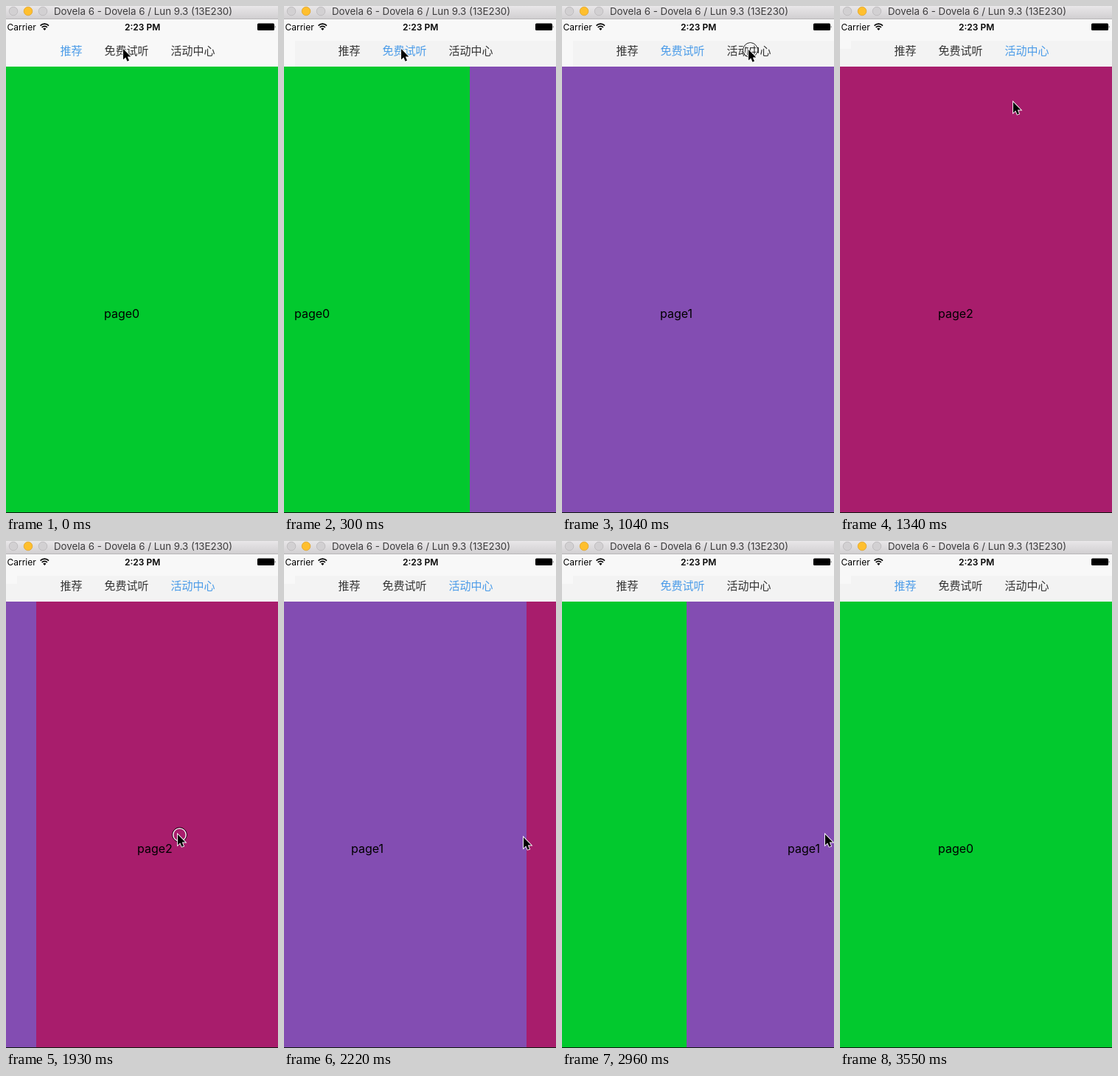
Animation, 369 px wide and 686 px high, one loop 3990 ms. Source, as an HTML page:

```html
<!DOCTYPE html>
<html lang="zh-CN">
<head>
<meta charset="utf-8">
<title>Paged tabs</title>
<style>
  html, body { margin: 0; width: 100%; height: 100%; overflow: hidden; background: #f8f8f8; }
  svg { display: block; width: 100%; height: 100%; }
  text { font-family: Inter, Roboto, sans-serif; }
  .tab { font: 15px "Noto Sans CJK SC", "Noto Sans CJK", "Noto Sans CJK JP", sans-serif; fill: #333; }
  .tab.on { fill: #4a9be8; }
  .page text { font-size: 16px; }
</style>
</head>
<body>
<svg viewBox="0 0 369 686">
  <defs>
    <linearGradient id="chrome" x2="0" y2="1">
      <stop stop-color="#e9e7e9"/><stop offset="1" stop-color="#d1cfd1"/>
    </linearGradient>
  </defs>

  <g id="pages"></g>
  <rect y="685" width="369" height="1" fill="#10180f"/>

  <rect width="369" height="82" fill="#f8f8f8"/>
  <rect id="shade" x="15" y="47" width="354" height="35" fill="#f3f3f3"/>
  <rect id="shadeLeft" y="58" width="15" height="24" fill="#f3f3f3"/>
  <g id="tabs"></g>

  <rect width="369" height="17" fill="url(#chrome)"/>
  <rect y="17" width="369" height="1" fill="#b9b7b9"/>
  <g stroke-width=".8" fill="#d2d0d2" stroke="#b9b7b9">
    <circle cx="10" cy="7" r="5.8"/>
    <circle cx="30" cy="7" r="5.8" fill="#ffbf2e" stroke="#e0a32a"/>
    <circle cx="50" cy="7" r="5.8"/>
  </g>
  <text x="65" y="12" font-size="13.3" fill="#3c3b3c">Dovela 6 - Dovela 6 / Lun 9.3 (13E230)</text>

  <text x="1.5" y="32.5" font-size="12">Carrier</text>
  <text x="161" y="32.5" font-size="12" font-weight="600">2:23 PM</text>
  <g fill="none" stroke="#000" stroke-width="1.7">
    <path d="M46.6 26.6a8 8 0 0 1 11.4 0M48.7 29a5 5 0 0 1 7.2 0"/>
    <path d="M52.3 33l-2.1-2.2a3 3 0 0 1 4.2 0z" fill="#000" stroke="none"/>
  </g>
  <rect x="341" y="23.5" width="23" height="9.5" rx="1.5"/>
  <path d="M364.8 26.3q1.5 1.9 0 3.8z"/>

  <g id="cursor">
    <g id="press" fill="none">
      <circle cx="2.5" cy=".5" r="9.8" stroke="#000"/>
      <circle cx="2.5" cy=".5" r="8.7" stroke="#fff" stroke-width="1.3"/>
    </g>
    <path d="M0 0V14.4L3.3 11.4 5.5 16.7 8 15.7 5.8 10.5H10.3Z"
      stroke="#fff" stroke-width="1.8" paint-order="stroke"/>
  </g>
</svg>
<script>
// The screen refreshes in coarse steps; all moments below are counted in them.
const LOOP = 3990, STEP = 147.8;
const PAGE_WIDTH = 375, PAGE_LEFT = -4;
const $ = id => document.getElementById(id);

// Two tab taps, then two swipes back; a swipe selects its tab after settling.
const pageTurns = [
  { start: 1.5, end: 2.83, page: 1, selectAt: 2 },
  { start: 7.2, end: 8.56, page: 2, selectAt: 8 },
  { start: 12.25, end: 15.72, page: 1, selectAt: 17 },
  { start: 18.85, end: 21.275, page: 0, selectAt: 23 }
];
const cursorMoves = [
  { start: 2.8, end: 5.8, x: 253, y: 59 },
  { start: 8.5, end: 10.2, x: 165, y: 400 },
  { start: 10.2, end: 12, x: 104, y: 392 },
  { start: 12, end: 13.8, x: 325, y: 401 },
  { start: 15.3, end: 17.7, x: 75, y: 381 },
  { start: 19, end: 20, x: 357, y: 397 },
  { start: 20.5, end: 23, x: 314, y: 606 }
];
const presses = [[1, 1], [7, 7], [12, 14], [19, 19]];
const cursorGone = 24;

function ease(u) {
  u = Math.min(1, Math.max(0, u));
  return u * u * (3 - 2 * u);
}
const follow = (moves, key, from, step) => moves.reduce(
  (value, move) => value + (move[key] - value) * ease((step - move.start) / (move.end - move.start)), from);
const show = (node, visible) => node.setAttribute("visibility", visible ? "inherit" : "hidden");
const place = (node, x, y) => node.setAttribute("transform", `translate(${Math.round(x)} ${Math.round(y)})`);

$("pages").innerHTML = ["#02c92e", "#834db2", "#a81d6c"].map((color, i) =>
  `<g class="page"><rect y="82" width="${PAGE_WIDTH}" height="604" fill="${color}"/>
   <text x="137" y="421.5">page${i}</text></g>`).join("");
$("tabs").innerHTML = [["推荐", 73.5], ["免费试听", 133.5], ["活动中心", 223.5]].map(([label, x]) =>
  `<text class="tab" x="${x}" y="65.8">${label}</text>`).join("");
const pages = [...$("pages").children], tabs = [...$("tabs").children];

function render(time) {
  const step = Math.floor(time / STEP);

  const scroll = PAGE_WIDTH * follow(pageTurns, "page", 0, step);
  pages.forEach((page, i) => place(page, PAGE_LEFT + i * PAGE_WIDTH - scroll, 0));

  const selected = pageTurns.findLast(turn => turn.selectAt <= step)?.page ?? 0;
  tabs.forEach((tab, i) => tab.classList.toggle("on", i === selected));
  show($("shade"), step >= 2);
  show($("shadeLeft"), step >= 9);

  place($("cursor"), follow(cursorMoves, "x", 159, step), follow(cursorMoves, "y", 58, step));
  show($("press"), presses.some(([from, to]) => from <= step && step <= to));
  show($("cursor"), step < cursorGone);
}

const start = performance.now();
function tick() {
  render((performance.now() - start) % LOOP);
  requestAnimationFrame(tick);
}
tick();
</script>
</body>
</html>
```
